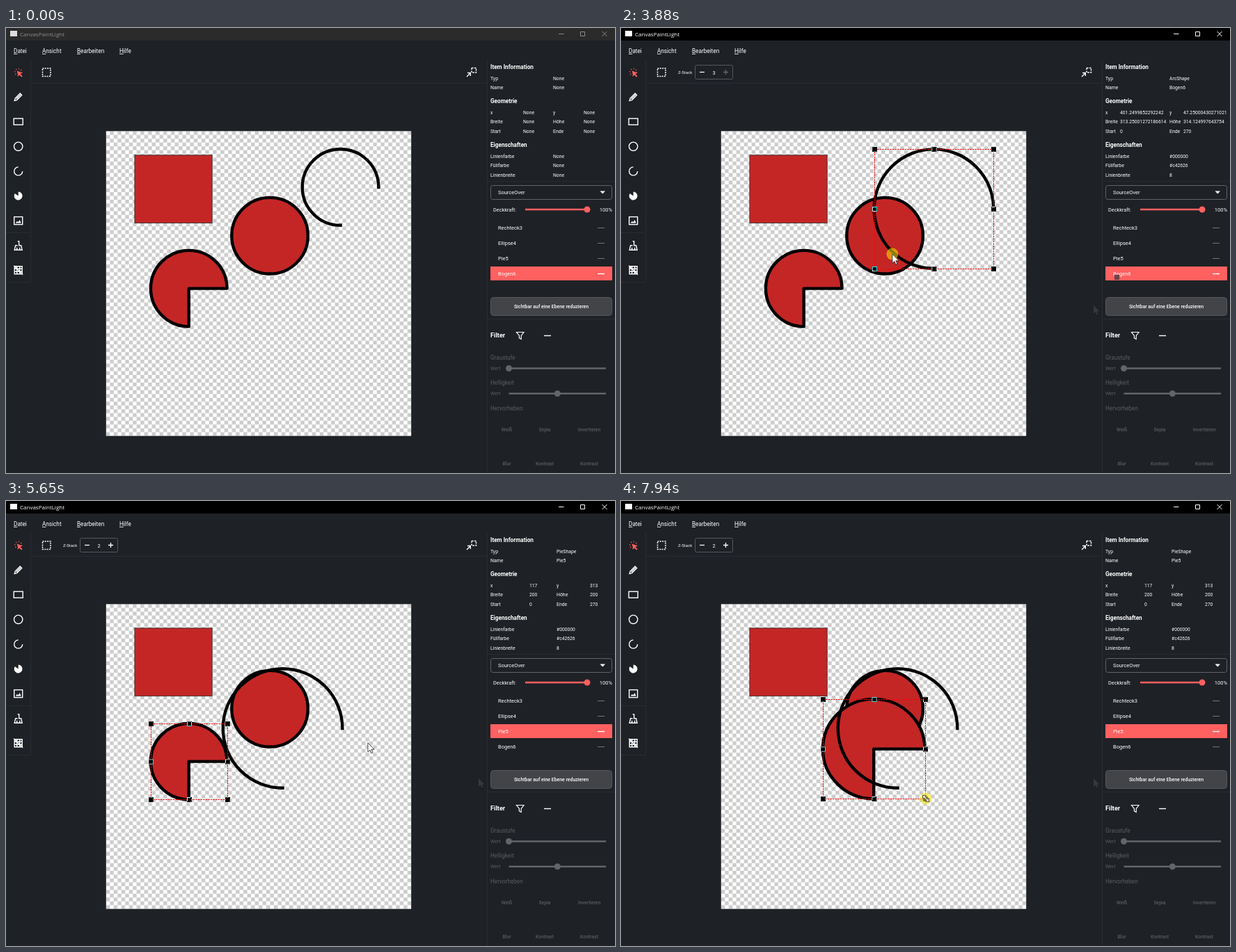
An HTML page for the animation above (8000 ms loop, 875x640 px).

```html
<!DOCTYPE html>
<html lang="de">
<head>
<meta charset="utf-8">
<title>CanvasPaintLight</title>
<style>
  html, body { margin: 0; width: 100%; height: 100%; overflow: hidden; background: #1e2126; }
  svg { display: block; width: 100%; height: 100%; font-family: Roboto, sans-serif; }
  .icon { fill: none; stroke: #fff; stroke-width: 1.4; }
  .rule { fill: none; stroke: #292d32; }
  .invert { mix-blend-mode: difference; fill: none; stroke: #fff; }
  .key { text-decoration: underline; text-decoration-thickness: .5px; }
</style>
</head>
<body>
<svg viewBox="0 0 875 640">
  <defs>
    <pattern id="checker" width="20" height="20" patternUnits="userSpaceOnUse"
      patternTransform="translate(143.8 148.3) scale(.548)">
      <rect width="20" height="20" fill="#fff"/>
      <path d="M10 0H20V10H10ZM0 10H10V20H0Z" fill="#ccc"/>
    </pattern>
  </defs>
  <rect width="875" height="640" fill="#1e2126"/>
  <path class="rule" d="M35.5 46V365M0 365.5H35M0 294.5H35M36 79.5H691M691.5 46V640M692 220.5H875M692 418.5H875"/>
  <g id="titlebar"></g>
  <g id="menu"></g>
  <g id="tools" class="icon"></g>
  <g class="icon">
    <rect x="52.5" y="58" width="11.5" height="11.5" stroke-width="1.5" stroke-dasharray="2 1.3"/>
    <path d="M662 70L667 65M663 64.5H667.3V69"/>
    <rect x="669" y="57.5" width="6.5" height="6.5" stroke-dasharray="2.6 1.3"/>
  </g>
  <g id="zstack"></g>
  <g id="board"></g>
  <g id="scene"></g>
  <g id="panel"></g>
  <g id="info"></g>
  <g id="layers"></g>
  <g id="pointer"></g>
</svg>
<script>
const LOOP = 8000;
const CORAL = '#ff6060', RED = '#c42626', DIM = '#595c60';
const put = (id, html) => {
  const node = document.getElementById(id);
  if (node.shown !== html) node.innerHTML = node.shown = html;
};

// Text whose capitals are centred vertically on y.
const text = (x, y, str, size = 6.9, fill = '#fff', extra = '') =>
  `<text x="${x}" y="${y + size * .356}" font-size="${size}" fill="${fill}" ${extra}>${str}</text>`;
const MEDIUM = 'font-weight="500" text-anchor="middle"';
const HEAVY = 'font-weight="700"';
const line = (d, color, width = 1) => `<path d="${d}" fill="none" stroke="${color}" stroke-width="${width}"/>`;
const rect = ([l, t, r, b], attrs) =>
  `<rect x="${l}" y="${t}" width="${r - l}" height="${b - t}" ${attrs}/>`;
const slider = (x0, x1, knob, y, color) =>
  line(`M${x0} ${y}H${x1}`, color, 2.6) + `<circle cx="${knob}" cy="${y}" r="4.5" fill="${color}"/>`;

// Screen box [left, top, right, bottom] of an area given in canvas units.
const ZOOM = .548;
const box = (x, y, w, h) => [x, y, x + w, y + h].map((v, i) => v * ZOOM + (i % 2 ? 148.3 : 143.8));

// Pointer journey: each move ends at x, y; drags also edit a shape.
const moves = [
  { from: 0, to: 260, x: 434, y: 541 },
  { from: 260, to: 800, x: 680, y: 399 },
  { from: 800, to: 1000, x: 730, y: 355 },
  { from: 1400, to: 1600, x: 452, y: 234 },
  { from: 1600, to: 2000, x: 426, y: 284 },
  { from: 2470, to: 3110, x: 364, y: 346, drag: 'arc', resize: 'left' },
  { from: 3220, to: 3550, x: 390, y: 325 },
  { from: 3880, to: 4420, x: 338, y: 392, drag: 'arc' },
  { from: 4490, to: 4650, x: 680, y: 396 },
  { from: 4650, to: 5110, x: 725, y: 336 },
  { from: 5510, to: 6080, x: 252, y: 363 },
  { from: 6440, to: 6800, x: 334, y: 328, drag: 'pie' },
  { from: 6850, to: 7400, x: 401, y: 394 },
  { from: 7660, to: 7940, x: 438, y: 428, drag: 'pie', resize: 'right' }
];
const FOCUS = 1070, SELECT_ARC = 1140, UPDATE = 3880, CLICK_PIE = 5370, SELECT_PIE = 5440;
const shapes = { arc: box(514.5, 47.25, 200, 200), pie: box(117, 313, 200, 200) };

// Drags run evenly, free moves slow down towards their end.
function progress(move, t) {
  const p = Math.min(1, Math.max(0, (t - move.from) / (move.to - move.from)));
  return move.drag ? p : 1 - (1 - p) ** 2;
}

function offset(i, t) {
  const p = progress(moves[i], t);
  return [(moves[i].x - moves[i - 1].x) * p, (moves[i].y - moves[i - 1].y) * p];
}

function shapeBox(name, t) {
  let [l, top, r, b] = shapes[name];
  moves.forEach(({ drag, resize }, i) => {
    if (drag !== name) return;
    const [dx, dy] = offset(i, t);
    if (resize !== 'right') l += dx;
    if (resize !== 'left') r += dx;
    if (!resize) top += dy;
    b += dy;
  });
  return [l, top, r, b];
}

function pointerAt(t) {
  let { x, y } = moves[0];
  for (let i = 1; i < moves.length; i++) {
    const [dx, dy] = offset(i, t);
    x += dx;
    y += dy;
  }
  return [x, y];
}

const within = (t, from, to) => t >= from && t < to;
const isPressed = t => [FOCUS, CLICK_PIE].some(click => within(t, click, click + 170)) ||
  moves.some(m => m.drag && within(t, m.from - 260, m.to + 60));
const resizeAt = t => moves.find((m, i) =>
  m.resize && within(t, moves[i - 1].to, moves[i + 1] ? moves[i + 1].from : LOOP))?.resize;

const ARROW = 'M0 0V13.2L3 10.4L5 15L7 14.1L5 9.6H9.2Z';
const DOUBLE_ARROW = 'M-6.5 0L-2.5-3.4V-1H2.5V-3.4L6.5 0L2.5 3.4V1H-2.5V3.4Z';

function pointerHtml(t) {
  let html = '';
  // Faint marks the pointer leaves behind on its first pass.
  if (t >= 800) html += `<path d="${ARROW}" transform="translate(679 399) scale(.9)" fill="#363a3f"/>`;
  if (within(t, FOCUS, SELECT_PIE)) html += '<rect x="709" y="355" width="7" height="7" fill="#6b4448"/>';
  if (t < 260) return html;
  const [x, y] = pointerAt(t), side = resizeAt(t);
  if (isPressed(t)) html += `<circle cx="${x}" cy="${y}" r="8.5" fill="#ffeb00" fill-opacity=".55"/>`;
  const turn = side ? `rotate(${side === 'left' ? -45 : 45})` : '';
  return html + `<path d="${side ? DOUBLE_ARROW : ARROW}" transform="translate(${x} ${y}) ${turn}"
    fill="#fff" stroke="#222" stroke-width=".8"/>`;
}

// Three quarters of an ellipse, counter-clockwise from the right.
function roundPath([l, t, r, b], closed) {
  const cx = (l + r) / 2, cy = (t + b) / 2;
  return `M${r} ${cy}A${(r - l) / 2} ${(b - t) / 2} 0 1 0 ${cx} ${b}` + (closed ? `L${cx} ${cy}Z` : '');
}

function selectionHtml(area) {
  const [l, t, r, b] = area.map(v => Math.round(v) + .5);
  let html = rect([l, t, r, b], 'fill="none" stroke="#f00" stroke-dasharray="2.4 1.2"');
  for (const x of [l, (l + r) / 2, r]) for (const y of [t, (t + b) / 2, b]) {
    if (x !== l && x !== r && y !== t && y !== b) continue;
    html += rect([x - 3, y - 3, x + 3, y + 3], 'class="invert"') + rect([x - 2.5, y - 2.5, x + 2.5, y + 2.5], '');
  }
  return html;
}

function sceneHtml(t) {
  const arc = shapeBox('arc', t), pie = shapeBox('pie', t);
  const pen = `stroke="#000" stroke-width="${8 * ZOOM}"`;
  return `<path d="${roundPath(pie, true)}" fill="${RED}" ${pen} stroke-linejoin="round"/>` +
    `<path d="${roundPath(arc)}" fill="none" ${pen} stroke-linecap="square"/>` +
    (t < SELECT_ARC ? '' : selectionHtml(t < SELECT_PIE ? arc : pie));
}

const sections = [
  { y: 56.5, title: 'Item Information', labels: ['Typ', 'Name'] },
  { y: 105.5, title: 'Geometrie', labels: ['x', 'Breite', 'Start'], second: ['y', 'Höhe', 'Ende'] },
  { y: 168.5, title: 'Eigenschaften', labels: ['Linienfarbe', 'Füllfarbe', 'Linienbreite'] }
];
const rowY = (section, i) => section.y + 15.6 + 13.8 * i;

const style = ['#000000', '#c42626', '8'];
const arcName = ['ArcShape', 'Bogen6'];
const infos = {
  none: { cols: [743, 786, 830] },
  arc: {
    cols: [717, 786, 806],
    values: [...arcName, '514.4999979510903', '200', '0', ...style], second: ['47.25000430271021', '200', '270']
  },
  resized: {
    cols: [717, 788, 808],
    values: [...arcName, '401.2499852292242', '313.25001272186614', '0', ...style],
    second: ['47.25000430271021', '314.124997643754', '270']
  },
  pie: {
    cols: [752, 791, 839],
    values: ['PieShape', 'Pie5', '117', '200', '0', ...style], second: ['313', '200', '270']
  }
};

function infoHtml({ cols: [left, mid, right], values = [], second = [] }) {
  let n = 0;
  const value = (x, y, str = 'None') => text(x, y, str, 6.75);
  return sections.map(s => s.labels.map((_, i) => {
    const y = rowY(s, i), first = value(s.second ? left : mid, y, values[n++]);
    return s.second ? first + text(mid, y, s.second[i]) + value(right, y, second[i]) : first;
  }).join('')).join('');
}

function titleHtml(active) {
  const ink = active ? '#fff' : '#8c8c8c';
  return `<rect width="875" height="18" fill="${active ? '#000' : '#2b2b2b'}"/>` +
    rect([6, 4, 16, 12], `fill="${active ? '#fff' : '#ddd'}"`) +
    text(20, 9, 'CanvasPaintLight', 8, ink, 'font-family="Open Sans, sans-serif"') +
    line('M794 8.5H801.5M825.5 5.5H831.5V11.5H825.5ZM856.5 5L863.5 12M863.5 5L856.5 12', ink);
}

const layersHtml = selected => ['Rechteck3', 'Ellipse4', 'Pie5', 'Bogen6'].map((name, i) => {
  const y = 287 + 22 * i, on = i === selected;
  return (on ? rect([696, y - 10, 871, y + 10], `fill="${CORAL}"`) : '') +
    text(707, y, name, 7.5) + line(`M850 ${y + .5}H860`, on ? '#fff' : '#777', on ? 1.4 : 1);
}).join('');

const zstackHtml = value => text(82, 64, 'Z-Stack', 6) +
  rect([106.5, 53.5, 160.5, 73.5], 'rx="2" fill="none" stroke="#55585c"') +
  line('M113 63.5H120', '#fff', 1.3) + text(133.5, 64, value, 7.5, '#fff', 'text-anchor="middle"') +
  line('M147 63.5H154M150.5 60V67', value === '3' ? '#66696d' : '#fff', 1.3);

// Tool icons, each drawn around its own centre.
const tools = [
  `<path d="M-2-2L6 1L3 2.5L6 6L4.5 7L1.5 4L0 6Z" fill="${CORAL}" stroke="none"/>` +
    `<circle r="5" stroke="${CORAL}" stroke-dasharray="1.2 2.7" pathLength="31"/>`,
  '<path d="M-5.5 5.5L-4.5 2L2.5-5L5-2.5L-2 4.5ZM-3 3L4-4"/>',
  '<rect x="-6.5" y="-4.5" width="13" height="9"/>',
  '<circle r="6.2"/>',
  '<path d="M0-6A6 6 0 1 0 6 0"/>',
  '<path d="M0 0V-6A6 6 0 1 1-5-3.5Z" fill="#fff" stroke="none"/>',
  '<rect x="-6" y="-5.5" width="12" height="11"/><path d="M-4 3.5L-2 1L0 2L2-1L4 3.5Z" fill="#fff" stroke="none"/>',
  '<path d="M-1-6H1V0H4L5.5 6.5H-5.5L-4 0H-1M-2 3V6M2 3V6"/>',
  '<path d="M-5.5-5.5H5.5V5.5H-5.5ZM-2-5.5V5.5M2-5.5V5.5M-5.5-2H5.5M-5.5 2H5.5M-6.5-6.5L6.5 6.5"/>'
];
put('tools', tools.map((icon, i) => `<g transform="translate(17.7 ${63.5 + 35.6 * i})">${icon}</g>`).join(''));

put('menu', Object.entries({ Datei: 11, Ansicht: 52, Bearbeiten: 102, Hilfe: 163 }).map(([s, x]) =>
  text(x, 33, `<tspan class="key">${s[0]}</tspan>${s.slice(1)}`, 8.2)).join(''));

put('board', rect(box(0, 0, 800, 800), 'fill="url(#checker)"') +
  rect(box(75, 63, 203, 178), `fill="${RED}" stroke="#222" stroke-width=".8"`) +
  rect(box(329.3, 174.5, 200, 200), `rx="${100 * ZOOM}" fill="${RED}" stroke="#000" stroke-width="${8 * ZOOM}"`));

put('panel',
  sections.map(s => text(696, s.y, s.title, 8.2, '#fff', HEAVY) +
    s.labels.map((label, i) => text(696, rowY(s, i), label)).join('')).join('') +
  rect([696.5, 226.5, 870.5, 246.5], 'rx="3" fill="none" stroke="#606367"') +
  text(707, 236.5, 'SourceOver', 7.5) + '<path d="M853.5 234.5H861L857.2 238.5Z" fill="#fff"/>' +
  text(700, 261.5, 'Deckkraft:', 7.3) + slider(746, 835, 835, 261, CORAL) +
  text(871, 261.5, '100%', 7.5, '#fff', 'text-anchor="end"') +
  rect([696.5, 387.5, 870.5, 413.5], 'rx="4" fill="#424447" stroke="#55585b"') +
  text(783.5, 400.5, 'Sichtbar auf eine Ebene reduzieren', 6.9, '#fff', MEDIUM) +
  text(696, 442, 'Filter', 9.1, '#fff', HEAVY) +
  line('M733.5 437.5H744L740.2 442.5V447.5L737.4 446V442.5Z', '#fff', 1.2) +
  line('M773 442.5H783', '#fff', 1.4) +
  ['Graustufe', 'Helligkeit', 'Hervorheben'].map((s, i) => {
    const y = 474 + 36.3 * i;
    return text(696, y, s, 8.2, DIM) + (i === 2 ? '' :
      text(696, y + 15.5, 'Wert', 7, DIM) + slider(722.5, 862, 722.5 + 69.8 * i, y + 15.5, '#636568'));
  }).join('') +
  [['Weiß', 'Blur', 719.5], ['Sepia', 'Kontrast', 774], ['Invertieren', 'Kontrast', 838]].map(([top, bottom, x]) =>
    text(x, 578, top, 6.8, DIM, MEDIUM) + text(x, 627, bottom, 6.8, DIM, MEDIUM)).join(''));

function draw(t) {
  const state = t < SELECT_ARC ? 'none' : t < UPDATE ? 'arc' : t < SELECT_PIE ? 'resized' : 'pie';
  put('titlebar', titleHtml(t >= FOCUS));
  put('info', infoHtml(infos[state]));
  put('layers', layersHtml(state === 'pie' ? 2 : 3));
  put('zstack', t < UPDATE ? '' : zstackHtml(state === 'pie' ? '2' : '3'));
  put('scene', sceneHtml(t));
  put('pointer', pointerHtml(t));
}

const start = performance.now();
function tick() {
  draw((performance.now() - start) % LOOP);
  requestAnimationFrame(tick);
}
tick();
</script>
</body>
</html>
```
